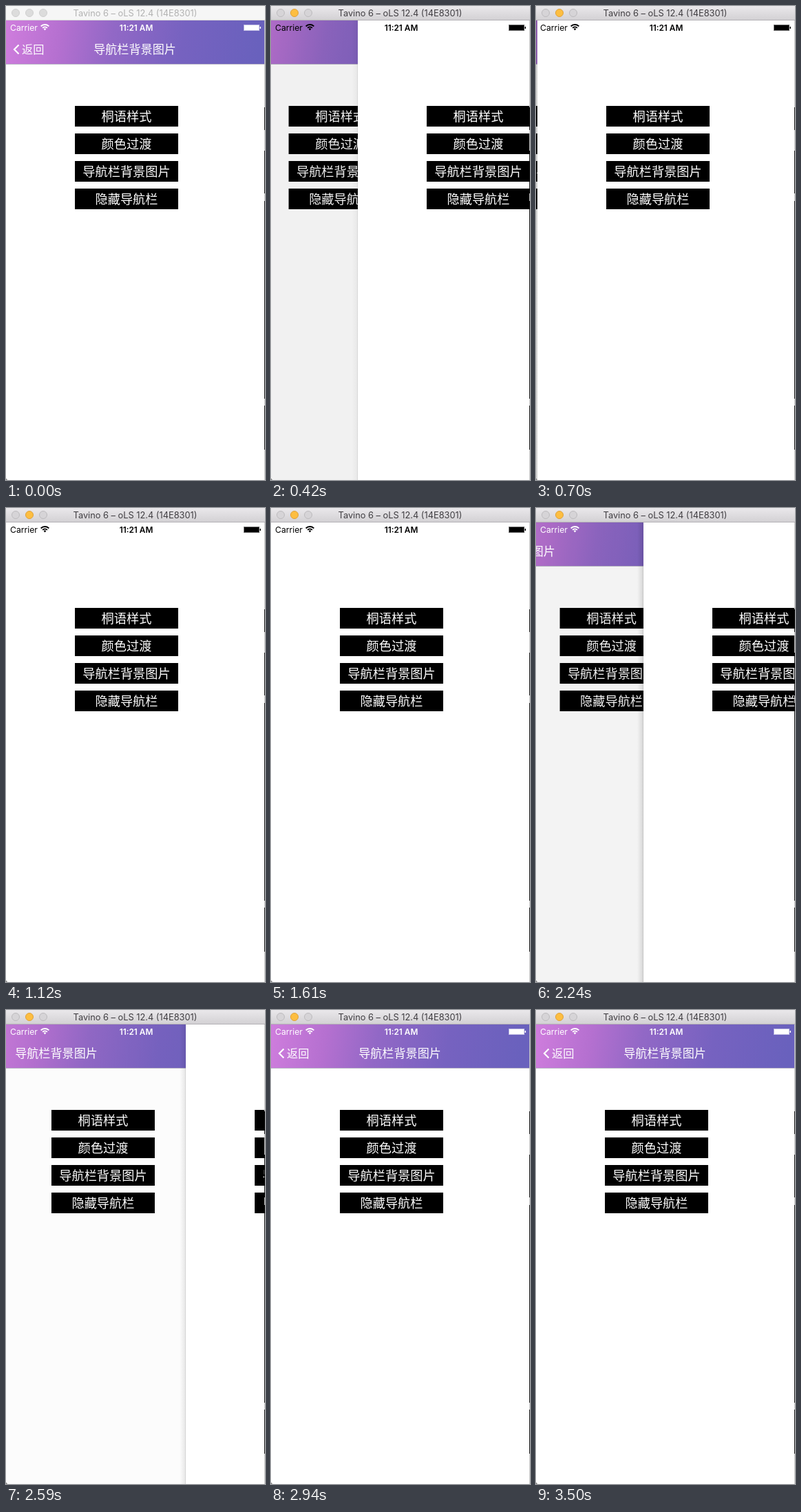
These frames come from a looping animation (376x688 px, 3570 ms). An HTML page with a canvas:

```html
<!DOCTYPE html>
<html lang="zh">
<head>
<meta charset="utf-8">
<style>
  html, body { margin: 0; width: 100%; height: 100%; overflow: hidden; background: #fff; }
  canvas { display: block; }
</style>
</head>
<body>
<canvas id="stage" width="376" height="688"></canvas>
<script>
const ctx = document.getElementById('stage').getContext('2d');
const LOOP = 3570, STEP = 70, WIDTH = 375, TOP = 21, HEIGHT = 688;
const PUSH_START = 295, POP_START = 1820;
const CJK = '"Noto Sans CJK SC", "Noto Sans CJK", sans-serif';
const LATIN = 'Inter, sans-serif';
const LABELS = ['桐语样式', '颜色过渡', '导航栏背景图片', '隐藏导航栏'];
// Swipe back: time and position of the upper page's left edge.
const SWIPE = [[1820, 0], [1890, 16], [2030, 84], [2310, 180], [2590, 261], [2730, 325], [2940, 375]];

function rect(x, y, w, h, color) {
  ctx.fillStyle = color;
  ctx.fillRect(x, y, w, h);
}

function text(str, x, y, font, color, align = 'center') {
  ctx.font = font;
  ctx.fillStyle = color;
  ctx.textAlign = align;
  ctx.fillText(str, x, y);
}

function clipped(x, y, w, h, draw) {
  ctx.save();
  ctx.beginPath();
  ctx.rect(x, y, w, h);
  ctx.clip();
  draw();
  ctx.restore();
}

function gradient(x0, y0, x1, y1, stops) {
  const g = ctx.createLinearGradient(x0, y0, x1, y1);
  for (const [at, color] of stops) g.addColorStop(at, color);
  return g;
}

// Left edge of the plain page: critically damped push, then a swipe back.
function edgeAt(t) {
  if (t < PUSH_START) return WIDTH;
  if (t < POP_START) {
    const s = Math.sqrt(1000 / 3) * (t - PUSH_START) / 1000;
    return Math.round(WIDTH * (1 + s) * Math.exp(-s));
  }
  const i = SWIPE.findIndex(([time]) => time > t);
  if (i < 0) return WIDTH;
  const [t0, x0] = SWIPE[i - 1], [t1, x1] = SWIPE[i];
  return Math.round(x0 + (x1 - x0) * (t - t0) / (t1 - t0));
}

function drawButtons(offset) {
  LABELS.forEach((label, i) => {
    const y = 145 + i * 40;
    rect(100 + offset, y, 150, 30, '#000');
    text(label, 175 + offset, y + 22, `18.2px ${CJK}`, '#fff');
  });
}

function drawNavBackground(offset) {
  ctx.save();
  ctx.translate(offset, 0);
  rect(0, TOP, WIDTH, 63.5, gradient(0, TOP, 364, 83, [
    [0, '#cf7ddd'], [.22, '#b570d0'], [.42, '#9268c6'], [.7, '#7662c0'], [1, '#6961bd']]));
  rect(0, 84, WIDTH, 1, '#b9b5c6');
  ctx.restore();
}

function drawNavItems(offset) {
  ctx.save();
  ctx.translate(offset, 0);
  text('导航栏背景图片', 187, 69.2, `500 17.1px ${CJK}`, '#fff');
  text('返回', 23, 69, `16.2px ${CJK}`, '#fff', 'left');
  ctx.strokeStyle = '#fff';
  ctx.lineWidth = 2.2;
  ctx.beginPath();
  ctx.moveTo(18.5, 56.5);
  ctx.lineTo(12, 63);
  ctx.lineTo(18.5, 69.5);
  ctx.stroke();
  ctx.restore();
}

function drawPages(edge, interactive) {
  const covered = 1 - edge / WIDTH;
  const parallax = -112 * covered;
  rect(0, TOP, WIDTH, HEIGHT - TOP, '#fff');
  clipped(0, TOP, edge, HEIGHT - TOP, () => {
    drawNavBackground(parallax);
    drawButtons(parallax);
    rect(0, TOP, edge, HEIGHT, `rgba(0,0,0,${Math.max(0, .128 * (covered - .22))})`);
    drawNavItems(edge - WIDTH);
    if (edge < WIDTH) {
      const alpha = interactive ? .05 + .13 * covered : .06 * covered;
      rect(edge - 9, TOP, 9, HEIGHT, gradient(edge - 9, 0, edge, 0,
        [[0, 'rgba(0,0,0,0)'], [1, `rgba(0,0,0,${alpha})`]]));
      rect(edge - 1, 85, 1, HEIGHT, 'rgba(0,0,0,.07)');
    }
  });
  clipped(edge, TOP, WIDTH - edge, HEIGHT - TOP, () => drawButtons(edge));
}

function drawStatusBar(color) {
  text('Carrier', 6, 35.5, `12.2px ${LATIN}`, color, 'left');
  text('11:21 AM', 189, 35.5, `600 11.8px ${LATIN}`, color);
  ctx.strokeStyle = color;
  ctx.lineWidth = 1.9;
  for (const r of [4.6, 8]) {
    ctx.beginPath();
    ctx.arc(56.5, 35, r, -Math.PI * .76, -Math.PI * .24);
    ctx.stroke();
  }
  ctx.fillStyle = color;
  ctx.beginPath();
  ctx.moveTo(56.5, 35.5);
  ctx.arc(56.5, 35, 2.5, -Math.PI * .76, -Math.PI * .24);
  ctx.fill();
  ctx.globalAlpha = .6;
  ctx.lineWidth = 1;
  ctx.strokeRect(345.5, 27.5, 22, 8);
  ctx.globalAlpha = 1;
  rect(346, 28, 21, 7, color);
  rect(368.5, 30, 1.5, 3, color);
}

function drawTitleBar(active) {
  const fill = active
    ? gradient(0, 0, 0, 20, [[0, '#eae8eb'], [1, '#d3d1d4']])
    : '#f6f6f6';
  rect(0, 0, 376, 20, fill);
  rect(0, 20, 376, 1, active ? '#b4b1b6' : '#d6d3d8');
  [14, 34, 54].forEach((x, i) => {
    const lit = active && i === 1;
    ctx.beginPath();
    ctx.arc(x, 10, 5.5, 0, Math.PI * 2);
    ctx.fillStyle = lit ? '#fdbe41' : active ? '#d6d4d7' : '#dcdcdc';
    ctx.strokeStyle = lit ? '#dfa138' : active ? '#bdbbbe' : '#cfcfcf';
    ctx.lineWidth = 1;
    ctx.fill();
    ctx.stroke();
  });
  text('Tavino 6 – oLS 12.4 (14E8301)', 187.5, 15, `12.8px ${LATIN}`, active ? '#403e42' : '#b2b2b2');
}

function drawDesktopEdge() {
  rect(375, TOP, 1, HEIGHT, '#c8c8c8');
  for (const [y, h] of [[147, 33], [210, 62], [283, 287], [580, 64]]) rect(375, y, 1, h, '#111');
  rect(0, 686, 1, 2, '#777');
  rect(0, 687, 2, 1, '#999');
}

function frame(now) {
  const t = Math.floor(now % LOOP / STEP) * STEP;
  const plainPage = t >= PUSH_START && t <= POP_START;
  drawPages(edgeAt(t), t > POP_START);
  drawStatusBar(plainPage ? '#000' : '#fff');
  drawTitleBar(t >= STEP);
  drawDesktopEdge();
  requestAnimationFrame(frame);
}

requestAnimationFrame(frame);
</script>
</body>
</html>
```
